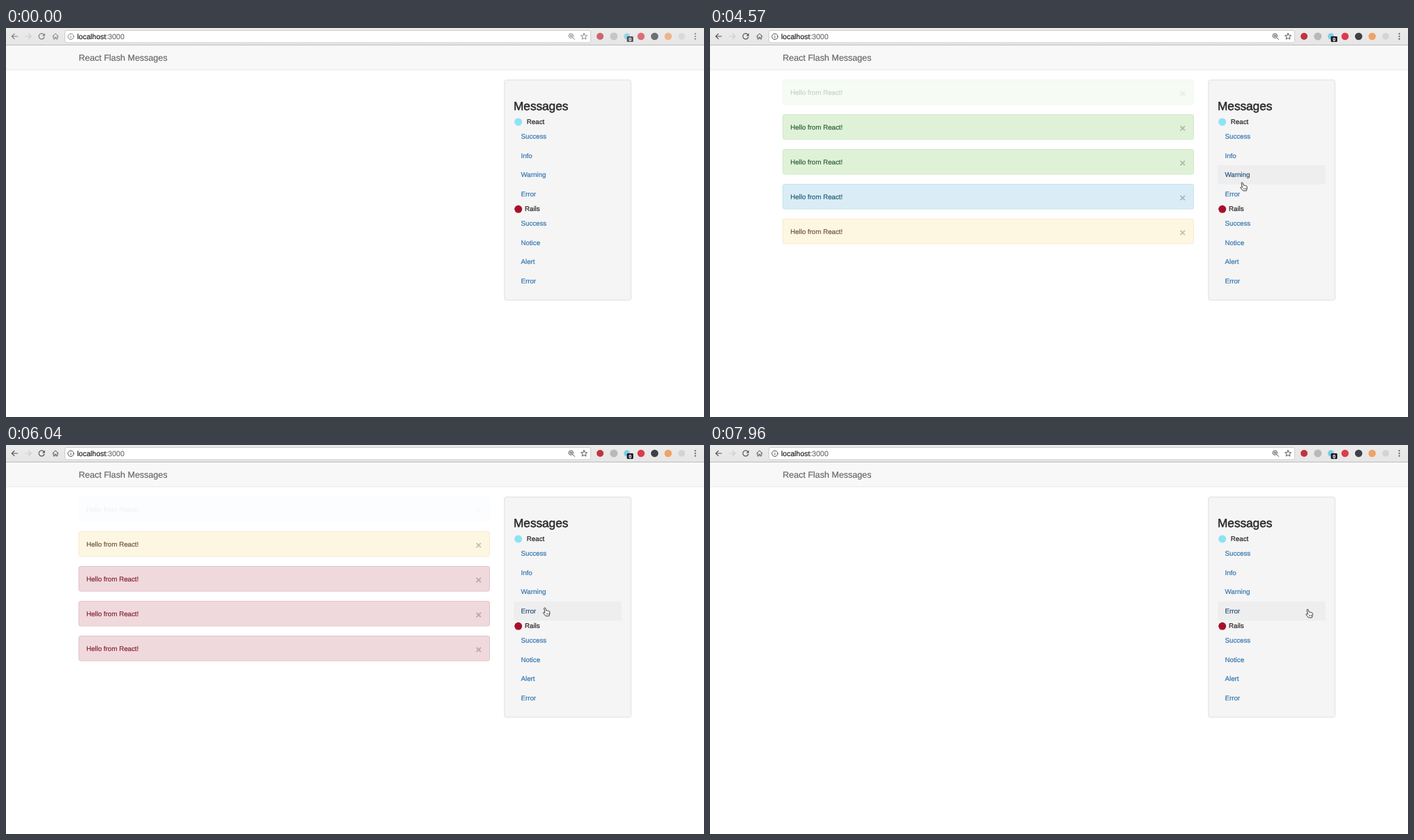
An HTML page that plays this animation: 1001x559 px, repeating every 8 s.

```html
<!DOCTYPE html>
<html lang="en">
<head>
<meta charset="utf-8">
<title>React Flash Messages</title>
<style>
  html, body { margin: 0; width: 100%; height: 100%; overflow: hidden; background: #fff; }
  svg { display: block; width: 1001px; height: 559px; font: 9.73px "Liberation Sans", Arial, sans-serif; }
  text, tspan { fill: currentColor; stroke: currentColor; stroke-width: .18; text-rendering: geometricPrecision; }
  .title { stroke-width: .55; }
  .line { fill: none; stroke: #555; stroke-width: 1.2; stroke-linecap: round; stroke-linejoin: round; }
  .link { color: #3073b0; }
  .link.on { color: #23527c; }
</style>
</head>
<body>
<svg id="stage" viewBox="0 0 1001 559">
  <defs>
    <linearGradient id="chrome" x2="0" y2="1">
      <stop stop-color="#ebebeb"/><stop offset="1" stop-color="#e6e6e6"/>
    </linearGradient>
  </defs>

  <rect width="1001" height="24.500" fill="url(#chrome)"/>
  <rect y="24" width="1001" height="1" fill="#bcbcbc"/>
  <rect x="84.500" y="3.500" width="754" height="17.500" rx="2.500" fill="#fff" stroke="#cdcdcd"/>
  <path class="line" d="M28 12h8M32.500 8.500l3.500 3.500-3.500 3.500" style="stroke:#cbcbcb"/>
  <g id="tools">
    <path class="line" d="M16.500 12H8.500M12 8.300L8.300 12l3.700 3.700"/>
    <path class="line" d="M54.300 9.500a4 4 0 1 0 .7 3.500"/>
    <path d="M55.800 7.500v4h-4z" fill="#555"/>
    <path class="line" d="M66.800 12l4.200-4 4.200 4M68.200 11.500v4.300h1.900v-2.500h1.800v2.500h1.900v-4.300" style="stroke-width:1"/>
    <g class="line" style="stroke-width:1">
      <circle cx="93" cy="12.300" r="4.200"/>
      <path d="M93 12v2.300M93 10.200v.1"/>
      <circle cx="810.200" cy="11.200" r="3.200"/>
      <path d="M812.700 13.700l2.800 2.800M808.800 11.200h2.800M810.200 9.800v2.800"/>
      <path d="M829 7.700l1.300 2.900 3.200.3-2.400 2.100.7 3.100-2.800-1.600-2.800 1.600.7-3.100-2.400-2.100 3.200-.3z"/>
    </g>
    <g id="icons"></g>
    <rect x="890.500" y="12" width="9" height="8" rx="1" fill="#14141e"/>
    <text x="895" y="18.700" font-size="7.500" font-weight="bold" color="#fff" text-anchor="middle">0</text>
    <g fill="#555"><circle cx="988.500" cy="8.300" r="1.100"/><circle cx="988.500" cy="12" r="1.100"/><circle cx="988.500" cy="15.700" r="1.100"/></g>
  </g>
  <text x="102" y="15.700" font-size="10.500" color="#1c1c1c">localhost<tspan color="#737373">:3000</tspan></text>

  <rect y="25" width="1001" height="35" fill="#f8f8f8"/>
  <rect y="59.500" width="1001" height="1" fill="#e7e7e7"/>
  <text x="104.300" y="46.700" font-size="12.500" color="#676767">React Flash Messages</text>

  <g id="alerts"></g>

  <rect x="714.800" y="74.800" width="181.500" height="316.300" rx="2.500" fill="#f5f5f5" stroke="#dfdfdf"/>
  <text class="title" x="728" y="117.600" font-size="17.200" color="#2b2b2b">Messages</text>
  <circle cx="734.700" cy="135" r="5.500" fill="#8fe3f3"/>
  <text x="746.800" y="137.700" color="#1c1c1c">React</text>
  <rect id="hover" x="728" width="155" height="27.800" rx="2" fill="#eee"/>
  <circle cx="734.700" cy="260.300" r="5.500" fill="#a8102a"/>
  <text x="744" y="263" color="#1c1c1c">Rails</text>
  <g id="links"></g>

  <g id="cursor" stroke-linejoin="round">
    <path id="arrow" d="M0 0v11l2.500-2.400 1.700 4 1.800-.8-1.700-3.900h3.500z" fill="#111" stroke="#fff" stroke-width=".8"/>
    <g id="hand" fill="#fff" stroke="#222" stroke-width=".9">
      <path d="M-1.500 .8C-1.100-.2 .2-.1 .5 .8L1.700 4.500C2.200 3.800 3.300 4 3.500 4.700 4.200 4.100 5.100 4.500 5.300 5.200 6.200 4.900 6.700 5.500 6.700 6.400L6.500 9.300 5.700 12H.9L-2.400 8.200C-3.200 7.300-2.200 6.200-1.200 6.900L-.2 7.500z"/>
      <path d="M1.900 8v2M3.400 8v2M4.900 8v2" stroke-width=".6"/>
    </g>
  </g>
</svg>

<script>
const LOOP = 8000, TOP = 74, STEP = 50, PHASE = 500, HOLD = 2000, ROW = 27.8;
const $ = id => document.getElementById(id);

function add(parent, tag, attrs, text = "") {
  const el = document.createElementNS("http://www.w3.org/2000/svg", tag);
  for (const key in attrs) el.setAttribute(key, attrs[key]);
  el.textContent = text;
  return parent.appendChild(el);
}

const show = (id, on) => $(id).setAttribute("visibility", on ? "visible" : "hidden");
const clamp = v => Math.max(0, Math.min(1, v));
const swing = v => 0.5 - Math.cos(clamp(v) * Math.PI) / 2;

// toolbar extensions: centre, radius, colour
[[852, 5, "#c2333f"], [871.7, 5.5, "#b9b9b9"], [890.5, 4.5, "#7fcde6"], [910.7, 5.2, "#dc3b4a"],
 [930.2, 5.3, "#3d4144"], [949.6, 5.3, "#eda269"], [969, 4.8, "#d4d4d4"]]
  .forEach(([cx, r, fill]) => add($("icons"), "circle", { cx, cy: 12, r, fill }));

// label, middle of the row
const rows = [["Success", 155], ["Info", 183], ["Warning", 210.8], ["Error", 238.6],
              ["Success", 280.3], ["Notice", 308.1], ["Alert", 335.9], ["Error", 363.7]];
const links = rows.map(([name, y]) => add($("links"), "text", { x: 738.5, y: y + 3.5, class: "link" }, name));

// fill, border, text
const styles = {
  success: ["#dff2d8", "#d2e8c8", "#2c5d36"],
  info: ["#daedf6", "#c3e3ee", "#225a76"],
  warning: ["#fdf7e2", "#f7ead0", "#6b5336"],
  error: ["#efd9dc", "#e1c3c8", "#87202f"]
};

const alerts = [
  ["success", 2245], ["success", 2810], ["success", 2990], ["info", 3625], ["warning", 4270],
  ["error", 4820], ["error", 5000], ["error", 5190]
].map(([kind, start]) => {
  const [fill, stroke, color] = styles[kind];
  const el = add($("alerts"), "g", {});
  add(el, "rect", { x: 104.5, y: 0.5, width: 589, height: 35.6, rx: 2.5, fill, stroke });
  add(el, "text", { x: 115.2, y: 22, color }, "Hello from React!");
  add(el, "text", { x: 677.8, y: 25, "font-size": 14.6, "font-weight": "bold", "text-anchor": "middle", opacity: 0.22 }, "×");
  return { el, start };
});

// cursor stops: time, x, y
const path = [[430, 640, 560], [870, 735, 345], [1250, 779, 153.5], [3120, 779, 153.5], [3420, 758.5, 179.5],
              [3760, 758.5, 179.5], [4100, 763, 207], [4420, 763, 207], [4700, 764, 233.5],
              [5950, 764, 233.5], [6400, 857.5, 236]];

function cursorAt(t) {
  const i = path.findIndex(p => p[0] > t);
  if (i < 0) return path[path.length - 1].slice(1);
  if (i === 0) return path[0].slice(1);
  const [t0, x0, y0] = path[i - 1], [t1, x1, y1] = path[i];
  const k = swing((t - t0) / (t1 - t0));
  return [x0 + (x1 - x0) * k, y0 + (y1 - y0) * k];
}

function draw(t) {
  let y = TOP;
  for (const { el, start } of alerts) {
    const age = t - start - HOLD;
    el.setAttribute("opacity", t < start ? 0 : 1 - swing(age / PHASE));
    el.setAttribute("transform", `translate(0 ${y.toFixed(2)})`);
    if (t >= start) y += STEP * (1 - swing((age - PHASE) / PHASE));
  }

  const [cx, cy] = cursorAt(t);
  $("cursor").setAttribute("transform", `translate(${cx.toFixed(2)} ${cy.toFixed(2)})`);
  show("hand", t > 1150);
  show("arrow", t <= 1150);

  const row = t < 1700 ? -1 : rows.findIndex(r => Math.abs(cy - r[1]) <= ROW / 2 + 0.1);
  links.forEach((el, i) => el.classList.toggle("on", i === row));
  show("hover", row >= 0);
  if (row >= 0) $("hover").setAttribute("y", rows[row][1] - ROW / 2);

  $("tools").setAttribute("opacity", t < 900 ? 0.72 : 1);
}

const begin = performance.now();
function tick() {
  draw((performance.now() - begin) % LOOP);
  requestAnimationFrame(tick);
}
tick();
</script>
</body>
</html>
```
